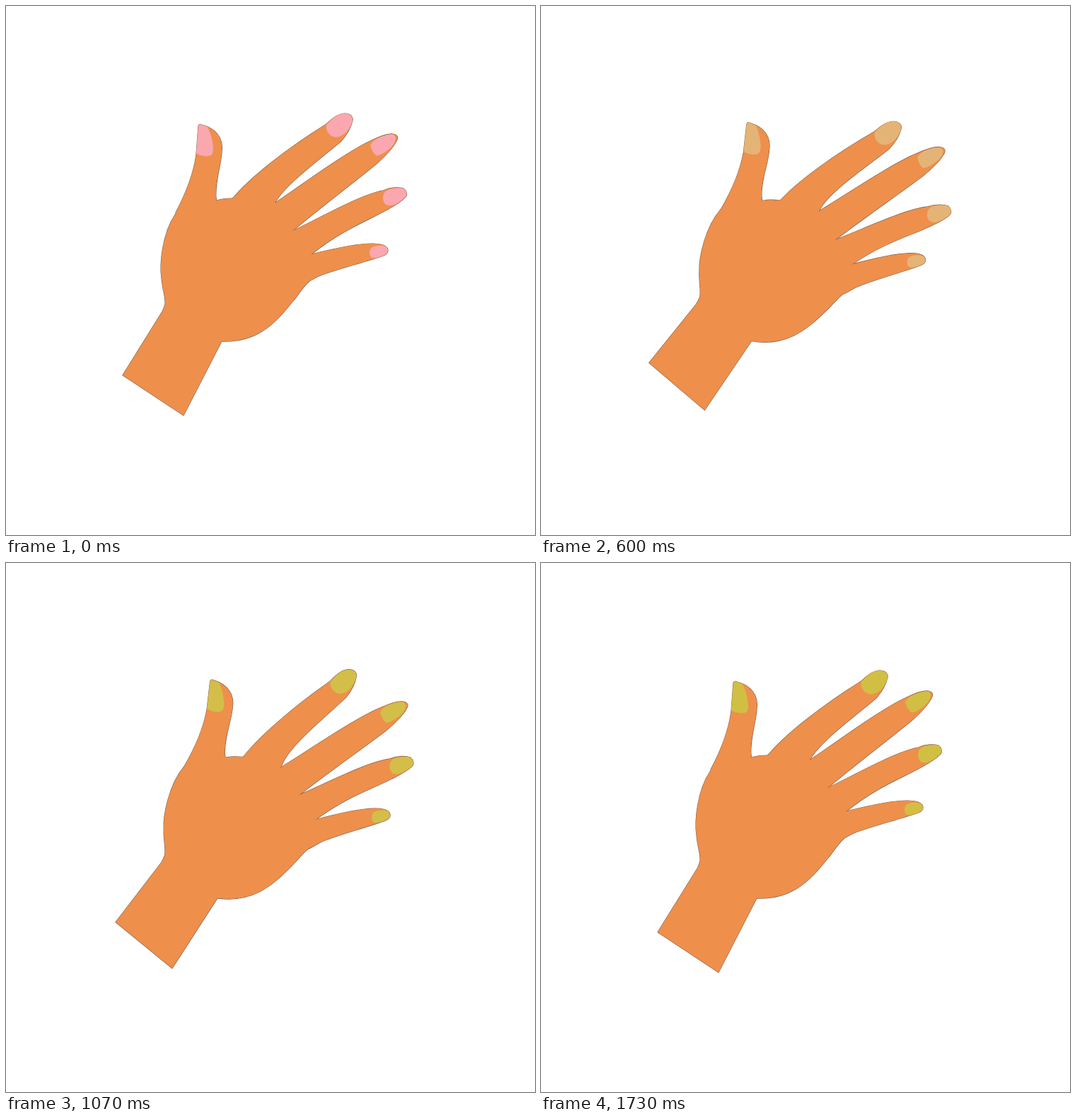
Write an HTML page with a canvas that moves like this. It is 748 by 748 pixels and loops after 1.79 s.

```html
<!DOCTYPE html>
<html lang="en">
<head>
<meta charset="utf-8">
<title>Waving hand</title>
<style>
html, body { margin: 0; width: 100%; height: 100%; overflow: hidden; background: #fff; }
canvas { display: block; }
</style>
</head>
<body>
<canvas id="stage" width="748" height="748"></canvas>
<script>
const ctx = document.getElementById('stage').getContext('2d');
const LOOP = 1790, STEP = 200 / 3, LAST = 26;
const SKIN = '#ee8f4c', EDGE = 'rgba(85,50,25,.8)';
const PINK = [250, 167, 176], YELLOW = [209, 191, 67];

const wrist = { x: 304, y: 413, peak: 11, turn: 8.45 };

const palm = new Path2D(`M165 522L251 579L305 474C325 475 346 470 362 460
  C382 448 397 428 410 412C416 404 421 396 428 390L424 358L394 327L370 294
  L324 274L321 272Q306 272 298 275L285 276L250 290L239 295
  C221 322 217 365 220 385C221 400 226 412 225 421Q224 426 221 432Z`);

// Each finger bends back about its joint (x, y) by `turn` degrees, most at step `peak`.
const finger = (x, y, peak, turn, shape, nail) =>
  ({ x, y, peak, turn: -turn, shape: new Path2D(shape), nail: new Path2D(nail) });

const fingers = [
  finger(275, 300, 10, 5.2,
    `M240 292C256 262 266 232 269 210L272 170Q273 166 277 168C296 173 308 186 305 207
     C304 225 295 250 297 271L299 285L270 330L242 310Z`,
    `M272 170Q273 166 277 168L285 171C290 182 292 190 293 200C293 209 291 212 286 212
     C280 213 273 211 269 208Z`),
  finger(350, 288, 17, 9.1,
    `M320 273C345 242 400 200 453 167C462 158 470 152 479 152C487 152 491 157 490 162
     C488 171 482 182 474 191C450 212 397 250 381 277L372 294L350 325L325 300Z`,
    `M453 168C462 158 470 152 479 152C487 152 491 157 490 162C488 170 483 178 478 181
     C472 186 464 187 459 183C454 179 452 174 453 168Z`),
  finger(394, 306, 11, 5.3,
    `M365 289L381 278C410 259 480 207 515 191C525 186 540 180 547 181
     C554 182 555 186 552 191C546 203 534 214 524 223C491 250 441 288 403 320
     L385 335L350 320Z`,
    `M515 197Q521 186 540 182Q550 180 551 187Q550 197 538 205Q527 213 523 211
     Q518 207 515 197Z`),
  finger(412, 339, 14, 4,
    `M385 328L403 319C440 302 500 267 533 261C545 256 556 256 562 258
     C567 262 568 267 564 271C556 279 546 284 537 289C515 302 475 316 432 351
     L415 365L380 350Z`,
    `M533 270Q534 261 543 259Q556 256 562 258C567 262 568 267 564 271Q556 278 549 281
     Q541 284 536 280Q533 276 533 270Z`),
  finger(430, 371, 11, 9.9,
    `M410 358L432 351C460 344 495 336 518 336C530 336 536 338 539 342
     C542 348 538 352 531 354C505 363 460 374 440 383L427 390L400 400Z`,
    `M514 349Q514 342 520 340Q532 337 538 341Q541 345 539 349Q534 354 524 356
     Q514 358 514 349Z`)
];

// Steady swing out until `peak`, steady swing back by the last step.
function rotate({ x, y, peak, turn }, step) {
  const amount = step < peak ? step / peak : (LAST - step) / (LAST - peak);
  ctx.translate(x, y);
  ctx.rotate(turn * amount * Math.PI / 180);
  ctx.translate(-x, -y);
}

function eachFinger(step, paint) {
  for (const f of fingers) {
    ctx.save();
    rotate(f, step);
    paint(f);
    ctx.restore();
  }
}

function draw() {
  const time = performance.now() % LOOP;
  const step = Math.min(LAST, Math.floor((time + 3.4) / STEP));
  const mix = Math.min(1, step / 17);
  const polish = `rgb(${PINK.map((c, i) => Math.round(c + (YELLOW[i] - c) * mix))})`;

  ctx.fillStyle = '#fff';
  ctx.fillRect(0, 0, 748, 748);
  ctx.save();
  rotate(wrist, step);

  // Outlines first, so only the outer hairline stays visible.
  ctx.strokeStyle = EDGE;
  ctx.lineWidth = 1.2;
  ctx.stroke(palm);
  eachFinger(step, f => ctx.stroke(f.shape));

  ctx.fillStyle = SKIN;
  ctx.fill(palm);
  eachFinger(step, f => ctx.fill(f.shape));

  ctx.fillStyle = polish;
  eachFinger(step, f => ctx.fill(f.nail));
  ctx.restore();
  requestAnimationFrame(draw);
}
draw();
</script>
</body>
</html>
```
